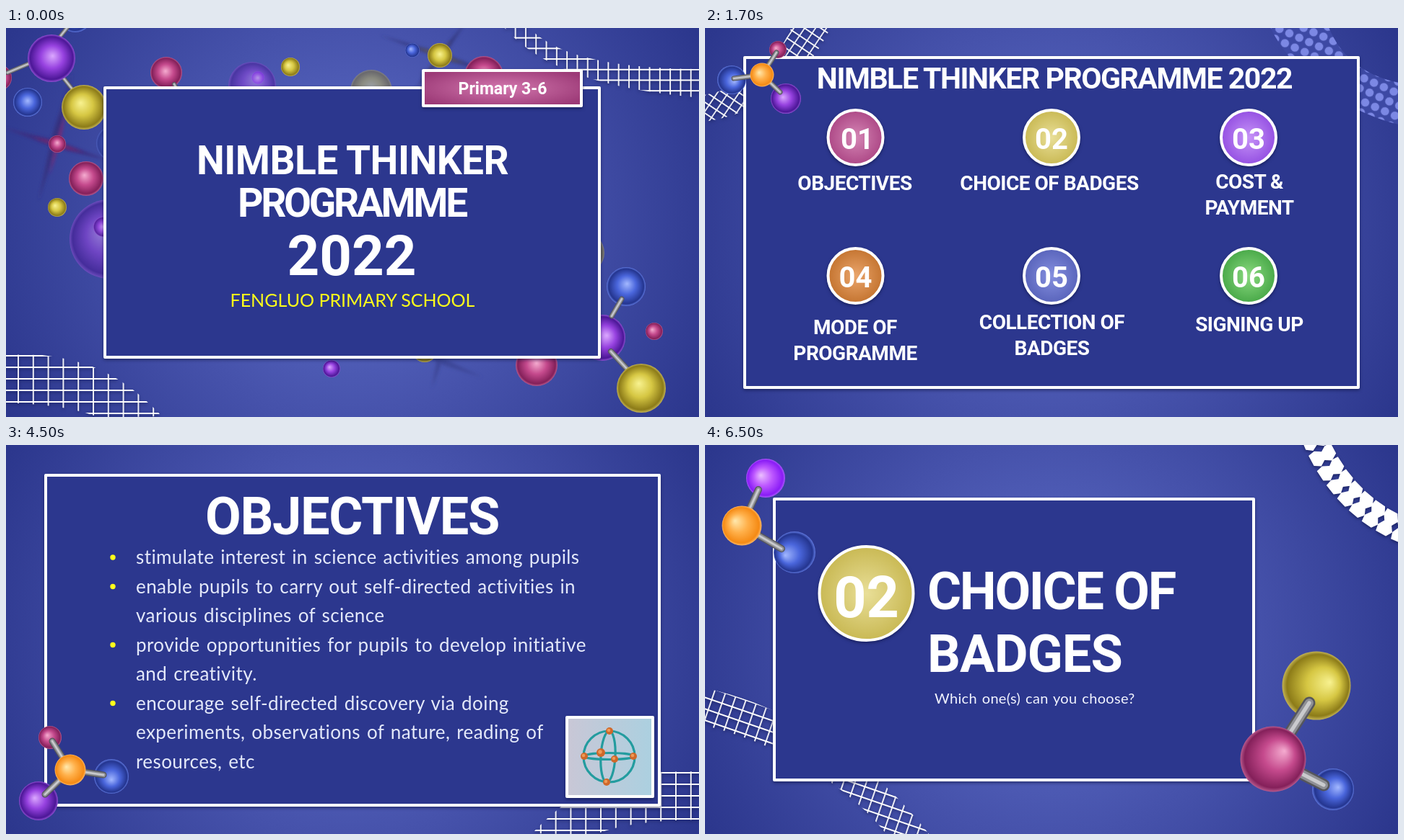
Write an HTML page that moves like this. It is 960 px wide and 540 px high and loops after 8 s.

```html
<!DOCTYPE html>
<html lang="en">
<head>
<meta charset="utf-8">
<title>Nimble Thinker Programme</title>
<style>
html, body { margin: 0; width: 100%; height: 100%; overflow: hidden; background: #2b368c; }
svg { display: block; width: 100vw; height: 100vh; }
text { fill: #fff; font-family: Roboto, sans-serif; font-weight: 700; }
text.body { font-family: Lato, sans-serif; font-weight: 400; }
text.wide { letter-spacing: .016em; word-spacing: .07em; }
.panel { fill: #2c378e; stroke: #fff; stroke-width: 4; stroke-linejoin: round; }
.lift { filter: drop-shadow(0 2px 2px rgba(10, 14, 60, .55)); }
.slide { animation: 8s step-end infinite; }
#s1 { animation-name: at1; }
#s2 { animation-name: at2; }
#s3 { animation-name: at3; }
#s4 { animation-name: at4; }
/* each slide is opaque and covers the ones before it */
@keyframes at1 { 0% { visibility: hidden } 6.25%, 100% { visibility: visible } }
@keyframes at2 { 0% { visibility: hidden } 31.25%, 100% { visibility: visible } }
@keyframes at3 { 0% { visibility: hidden } 56.25%, 100% { visibility: visible } }
@keyframes at4 { 0% { visibility: hidden } 81.25%, 100% { visibility: visible } }
</style>
</head>
<body>
<svg id="stage" viewBox="0 0 960 540" preserveAspectRatio="none" xmlns="http://www.w3.org/2000/svg"></svg>
<script>
// highlight, main, shadow, rim
const tones = {
  pink:   ['#f5acd0', '#c54a8d', '#84205a', '#b85a8e'],
  yellow: ['#f8f290', '#d6c743', '#8c7b18', '#c2b255'],
  blue:   ['#a3b8ff', '#4a66dc', '#24358f', '#6079e0'],
  purple: ['#dba8ff', '#9742e0', '#4c1797', '#9350d4'],
  violet: ['#ecc0ff', '#bd58ff', '#8a1cf6', '#a95af8'],
  orange: ['#ffe9ae', '#ffb04a', '#f58a14', '#ffb765']
};
const discs = {
  pink:   ['#d586b5', '#ad4886'],
  yellow: ['#e9df98', '#c9b954'],
  purple: ['#c794f8', '#9450e2'],
  orange: ['#eaa56b', '#c47430'],
  blue:   ['#858fdf', '#5964bb'],
  green:  ['#8bda80', '#48a848']
};
let defs = '', count = 0;

const shade = (stops, attrs = '', at = i => i / (stops.length - 1)) => {
  const id = 'g' + count++;
  defs += `<radialGradient id="${id}" ${attrs}>` + stops.map((c, i) =>
    `<stop offset="${at(i)}" stop-color="${c}"/>`).join('') + '</radialGradient>';
  return `url(#${id})`;
};

// hx, hy: highlight offset as a share of the radius
const ball = (x, y, r, tone, hx = -.25, hy = -.2, o = 1) => {
  const fill = shade(tones[tone], `cx=".5" cy=".5" r=".5" fx="${.5 + hx / 2}" fy="${.5 + hy / 2}"`,
    i => [0, .48, .9, 1][i]);
  return `<circle cx="${x}" cy="${y}" r="${r}" fill="${fill}" opacity="${o}"/>`;
};

const rod = (x1, y1, x2, y2, w) => [['#55565c', w], ['#8f9095', w * .7], ['#c9cacd', w * .3]].map(([c, s]) =>
  `<path d="M${x1} ${y1}L${x2} ${y2}" stroke="${c}" stroke-width="${s}" stroke-linecap="round"/>`).join('');

// outer atoms, then rods, then the hub on top
const molecule = (hub, atoms, rods, w) => '<g>' + atoms.map(a => ball(...a)).join('') +
  rods.map(p => rod(p[0], p[1], hub[0], hub[1], w)).join('') + ball(...hub) + '</g>';

const spike = (x1, y1, x2, y2, w, fill) => {
  const mx = (x1 + x2) / 2, my = (y1 + y2) / 2, d = Math.hypot(x2 - x1, y2 - y1);
  const nx = (y1 - y2) / d * w, ny = (x2 - x1) / d * w;
  return `<path d="M${x1} ${y1}L${mx + nx} ${my + ny} ${x2} ${y2} ${mx - nx} ${my - ny}Z" fill="${fill}" filter="url(#soft)"/>`;
};

const mesh = (d, w, h, angle = 0, ox = 0, oy = 0) => {
  const id = 'm' + count++;
  defs += `<pattern id="${id}" width="${w}" height="${h}" patternUnits="userSpaceOnUse"
    patternTransform="translate(${ox} ${oy}) rotate(${angle})">
    <path d="M0 2H${w}M2 0V${h}" stroke="#fff" stroke-width="1.8"/></pattern>`;
  return `<path class="lift" d="${d}" fill="url(#${id})"/>`;
};

// chain of notched white tiles along a quadratic curve
const chain = (p, q, r, n, k) => {
  const tile = 'M-12-20 6-20 13-9 7 1 13 10 7 20-11 20-13 9-7-1-13-10Z';
  let out = '';
  for (let i = 0; i < n; i++) {
    const t = i / (n - 1), u = 1 - t;
    const at = j => u * u * p[j] + 2 * u * t * q[j] + t * t * r[j];
    const to = j => u * (q[j] - p[j]) + t * (r[j] - q[j]);
    const a = Math.atan2(to(1), to(0)) * 180 / Math.PI;
    out += `<path d="${tile}" transform="translate(${at(0)} ${at(1)}) rotate(${a}) scale(${k})"/>`;
  }
  return `<g fill="#fff" class="lift">${out}</g>`;
};

const panel = (x, y, w, h, fill) =>
  `<rect class="panel lift" x="${x}" y="${y}" width="${w}" height="${h}" ${fill ? `style="fill:${fill}"` : ''}/>`;

const text = (s, x, y, size, gap = 0, anchor = 'middle') =>
  `<text x="${x}" y="${y}" font-size="${size}" text-anchor="${anchor}" letter-spacing="${gap}em">${s}</text>`;

const body = (s, x, y, size, fill, kind = 'wide', anchor = 'start') =>
  `<text class="body ${kind}" x="${x}" y="${y}" font-size="${size}" text-anchor="${anchor}" style="fill:${fill}">${s}</text>`;

const badge = (x, y, r, tone, num, size, dy, dx = 0) =>
  `<circle class="lift" cx="${x}" cy="${y}" r="${r}" fill="${shade(discs[tone])}" stroke="#fff" stroke-width="4"/>` +
  text(num, x + dx, y + dy, size);

const corner = 'M-20 453L50 454C120 462 165 485 216 539L130 541C95 527 50 521-20 520Z';

function cover() {
  return mesh('M690-1C742 58 830 85 961 97V57C850 56 765 42 724-1Z', 14.3, 14.7, 0, 3, -3) +
    mesh(corner, 20.8, 16, 0, 15, 5) +
    spike(92, 62, 45, 240, 5, '#35307f') + spike(-5, 138, 142, 184, 5, '#3b2f80') +
    spike(84, 112, 60, 205, 2.5, '#83286f') + spike(36, 151, 108, 173, 2.5, '#83286f') +
    spike(518, 10, 690, 68, 4, '#353a84') + spike(565, 88, 640, -12, 4, '#353a84') +
    spike(566, 26, 636, 50, 2.5, '#74694a') + spike(586, 58, 616, 18, 2.5, '#74694a') +
    spike(560, 445, 660, 485, 4, '#3d4798') + spike(590, 500, 612, 420, 4, '#3d4798') +
    ball(96, -17, 23, 'blue') + rod(70, 18, 86, -2, 6) +
    ball(-10, 69, 18, 'pink', .2, 0) + rod(2, 62, 40, 46, 6) + rod(80, 70, 96, 90, 6) +
    ball(63, 42, 33, 'purple', .05, -.1) + ball(108, 110, 31, 'yellow', -.15, -.2) +
    ball(30, 103, 20, 'blue', 0, -.1) +
    ball(150, 160, 25, 'blue', 0, 0, .45) +
    ball(71, 161, 12, 'pink', 0, -.15) + ball(111, 209, 24, 'pink', -.1, -.2) +
    ball(143, 293, 55, 'purple', -.2, -.2, .55) + ball(135, 276, 14, 'purple', 0, 0, .8) +
    ball(71, 249, 13, 'yellow') +
    ball(222, 62, 22, 'pink', -.05, -.1) + rod(233, 78, 241, 92, 6) +
    ball(341, 80, 33, 'purple', .2, -.3, .5) + ball(349, 69, 9, 'violet', 0, 0, .4) +
    ball(394, 54, 13, 'yellow') + ball(506, 87, 29, 'yellow', 0, -.2, .45) +
    ball(563, 31, 10, 'blue') + ball(601, 38, 17, 'yellow', 0, -.1) + ball(662, 66, 27, 'pink', 0, -.1) +
    ball(800, 312, 29, 'yellow', 0, 0, .5) +
    ball(859, 359, 27, 'blue', .05, -.15) + ball(826, 430, 32, 'purple', .2, -.1) +
    rod(853, 376, 839, 400, 7) + rod(838, 449, 861, 474, 8) +
    ball(880, 500, 34, 'yellow', -.1, -.2) + ball(898, 421, 12, 'pink') +
    ball(735, 468, 29, 'pink', 0, -.1) + ball(451, 473, 12, 'purple') + ball(580, 446, 18, 'yellow') +
    panel(137, 83, 685, 374) +
    panel(578, 59, 219, 49, shade(['#d377ae', '#9c3a77'], 'r=".6"')) +
    text('Primary 3-6', 688, 92, 23) +
    text('NIMBLE THINKER', 480, 203, 55, -.01) +
    text('PROGRAMME', 479, 262, 55, -.06) +
    text('2022', 479, 343, 78) +
    body('FENGLUO PRIMARY SCHOOL', 480, 387, 25, '#ffff1a', '', 'middle');
}

function contents() {
  const items = [
    [208.5, 152, 'pink', '01', ['OBJECTIVES'], 225, 207.5],
    [480, 152, 'yellow', '02', ['CHOICE OF BADGES'], 225, 477],
    [753, 152, 'purple', '03', ['COST &amp;', 'PAYMENT'], 223, 754],
    [208.5, 344, 'orange', '04', ['MODE OF', 'PROGRAMME'], 425, 208],
    [480, 344, 'blue', '05', ['COLLECTION OF', 'BADGES'], 418, 480.5],
    [753, 344, 'green', '06', ['SIGNING UP'], 421, 754]
  ];
  const dots = 'M783-1C810 55 875 112 961 134V76C910 65 880 38 864-1Z';
  defs += `<pattern id="dots" width="15" height="15" patternUnits="userSpaceOnUse" patternTransform="rotate(24)">
    <circle cx="7.5" cy="7.5" r="5.8" fill="#7c88e4"/></pattern>`;
  return mesh('M-1 93C55 82 95 55 120-1H174C145 62 85 118-1 130Z', 12.5, 12.5, -56) +
    `<path d="${dots}" fill="#3d49a4"/><path d="${dots}" fill="url(#dots)"/>` +
    panel(55, 41, 850, 458) +
    molecule([79, 65, 16.5, 'orange'],
      [[101, 30, 12, 'pink'], [37, 72, 20, 'blue', .2, .1], [112, 98, 21, 'purple', -.2, -.1]],
      [[99, 34], [40, 70], [104, 89]], 7) +
    text('NIMBLE THINKER PROGRAMME 2022', 484, 84, 41, -.035) +
    items.map(([x, y, tone, num, lines, by, tx]) =>
      badge(x, y, 38, tone, num, 40, 16, num === '01' ? 2.5 : 0) +
      lines.map((s, i) => text(s, tx, by + 36 * i, 28, -.018)).join('')).join('');
}

function partOne() {
  return mesh('M790-1C822 42 868 95 961 150V76C915 58 880 30 852-1Z', 14.5, 14.5, 30, 4, 0) +
    chain([-4, 380], [78, 432], [136, 545], 10, 1) +
    panel(130, 91, 700, 358) +
    molecule([176, 231, 37, 'pink', -.4, -.05],
      [[157, 157, 24, 'blue', -.3, -.2], [81, 248, 39, 'yellow', -.35, -.25]],
      [[160, 169], [100, 242]], 14) +
    molecule([739, 163, 37, 'orange', -.35, -.25],
      [[784, 77, 37, 'violet', -.25, -.15], [837, 212, 39, 'blue', -.45, .15]],
      [[771, 97], [812, 206]], 13) +
    badge(480, 192, 65, 'pink', '01', 79, 32, 5) +
    text('OBJECTIVES', 480.5, 353, 72, -.014);
}

function aims() {
  const lines = [
    ['stimulate interest in science activities among pupils', 1],
    ['enable pupils to carry out self-directed activities in', 1],
    ['various disciplines of science'],
    ['provide opportunities for pupils to develop initiative', 1],
    ['and creativity.'],
    ['encourage self-directed discovery via doing', 1],
    ['experiments, observations of nature, reading of'],
    ['resources, etc']
  ];
  defs += `<linearGradient id="sky"><stop stop-color="#c9c7d6"/><stop offset="1" stop-color="#abd0e0"/></linearGradient>`;
  const node = (x, y, r) => `<circle cx="${x}" cy="${y}" r="${r}" fill="#d0682a"/>
    <circle cx="${x - 1}" cy="${y - 1}" r="${r * .45}" fill="#ee9a58"/>`;
  return `<g transform="translate(945 0) scale(-1 1)">${mesh(corner, 20.8, 16, 0, 15, 5)}</g>` +
    panel(55, 42, 850, 458) +
    molecule([89, 451, 21.5, 'orange'],
      [[61, 406, 16, 'pink'], [146, 460, 24, 'blue', 0, .2], [45, 494, 27, 'purple', -.2, -.15]],
      [[64, 411], [135, 458], [54, 485]], 9) +
    text('OBJECTIVES', 479.5, 124, 72, -.018) +
    lines.map(([s, dot], i) => {
      const y = 165 + 40.5 * i;
      return (dot ? `<circle cx="148" cy="${y - 9}" r="3.7" fill="#ffff1a"/>` : '') + body(s, 180, y, 26, '#e4e9fa');
    }).join('') +
    panel(777, 378, 119, 110, 'url(#sky)') +
    `<g fill="none" stroke="#239c9f" stroke-width="3.2">
      <circle cx="835.5" cy="432.5" r="35.5"/>
      <ellipse cx="834" cy="432.5" rx="10" ry="35.5" transform="rotate(3 834 432)"/>
      <ellipse cx="835.5" cy="432" rx="35" ry="4.5"/></g>` +
    node(836, 397, 5) + node(832, 468, 5) + node(801, 432, 5) + node(869, 432, 5) +
    node(824, 427, 6) + node(843, 436, 5);
}

function partTwo() {
  return mesh('M-1 337C110 362 220 425 311 541H252C205 480 115 418-1 389Z', 15, 15, 19, 2, 0) +
    chain([846, -6], [884, 82], [966, 118], 9, .88) +
    panel(96, 75, 664, 390) +
    molecule([51, 112, 27.5, 'orange', -.35, -.25],
      [[84, 46, 27, 'violet', -.25, -.15], [124, 149, 29, 'blue', -.45, .15]],
      [[74, 62], [106, 144]], 10) +
    molecule([787, 436, 45.5, 'pink', .35, -.25],
      [[847, 334, 47.5, 'yellow', .4, -.1], [870, 478, 29, 'blue', .25, -.1]],
      [[837, 358], [857, 472]], 17) +
    badge(223.5, 206, 65, 'yellow', '02', 79, 33) +
    text('CHOICE OF', 308, 228, 72, -.032, 'start') +
    text('BADGES', 308, 315, 72, -.012, 'start') +
    body('Which one(s) can you choose?', 318, 359, 20, '#f2f4ff');
}

const back = shade(['#6070ca', '#4652ab', '#2b368c'], 'gradientUnits="userSpaceOnUse" cx="480" cy="270" r="551"');
defs += '<filter id="soft" x="-30%" y="-30%" width="160%" height="160%"><feGaussianBlur stdDeviation="2"/></filter>';
const slides = [cover, contents, partOne, aims, partTwo].map((draw, i) =>
  `<g class="slide" id="s${i}"><rect width="960" height="540" fill="${back}"/>${draw()}</g>`).join('');
document.getElementById('stage').innerHTML = `<defs>${defs}</defs>${slides}`;
</script>
</body>
</html>
```
